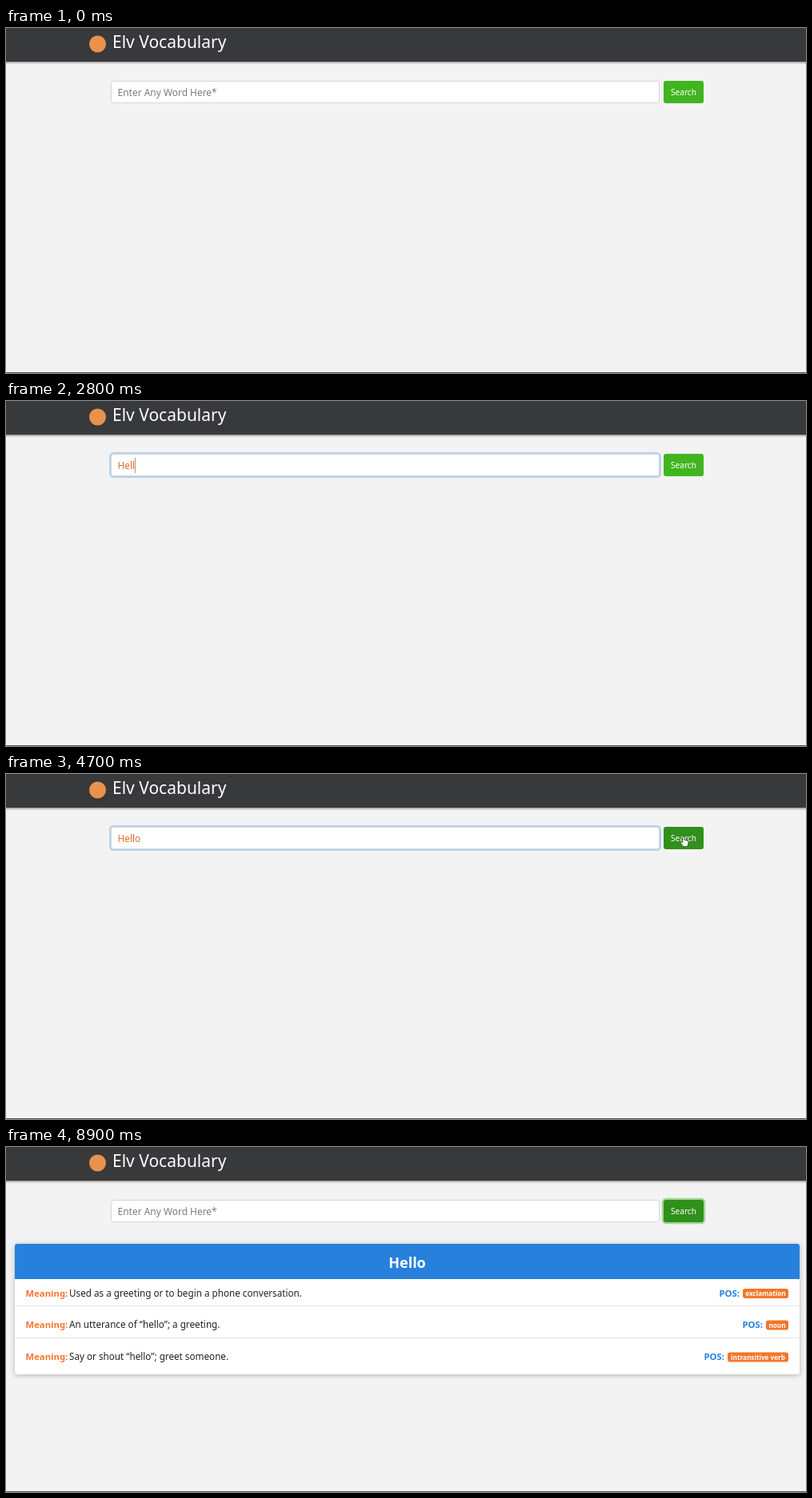
An HTML page for the animation above (9.4 s loop, 1000 by 431 pixels).

```html
<!DOCTYPE html>
<html lang="en">
<head>
<meta charset="utf-8">
<title>Word lookup</title>
<style>
  html, body { margin: 0; width: 100%; height: 100%; overflow: hidden; background: #f3f3f3; }
  svg { display: block; width: 1000px; height: 431px; font: 11.7px "Noto Sans", sans-serif; }
  .header { filter: drop-shadow(0 1px 1.5px #0008); }
  .card { filter: drop-shadow(0 1px 3px #0004); }
  .label { font-size: 11.3px; font-weight: 600; }
  .badge { font-size: 8.2px; font-weight: 700; fill: #fff; }
  .orange { fill: #f4762a; }
  .blue { fill: #2780dc; }
</style>
</head>
<body>
<svg viewBox="0 0 1000 431">
  <rect width="1000" height="431" fill="#f3f3f3"/>
  <rect class="header" x="-5" y="-5" width="1010" height="47" fill="#38393b"/>
  <circle cx="114.5" cy="20" r="10.5" fill="#e8924e"/>
  <text x="133" y="25" font-size="21" fill="#fff">Elv Vocabulary</text>

  <rect id="inputRing" x="130.3" y="65.3" width="687.4" height="29.4" rx="4" fill="none" stroke="#b9d2ee" stroke-width="2.6"/>
  <rect x="131.5" y="66.5" width="685" height="27" rx="3" fill="#fff" stroke="#d3d6d9"/>
  <text id="placeholder" x="139.6" y="84.7" font-size="11.95" fill="#797c80">Enter Any Word Here*</text>
  <text id="typed" x="139.6" y="84.7" font-size="11.8" fill="#dc6e2c"></text>
  <rect id="caret" y="71" width="1" height="19" fill="#d08a5c"/>

  <rect id="buttonRing" x="821" y="65" width="52" height="30" rx="4" fill="none" stroke="#a3d596" stroke-width="2.4"/>
  <rect id="button" x="822" y="66" width="50" height="28" rx="3"/>
  <text x="847" y="84" font-size="10.05" fill="#fff" text-anchor="middle">Search</text>
  <path id="hand" d="M-2 -6.5q1-1 2 0v4l4 1q1.3.4 1 2l-.7 3q-.3 1-1 2h-4.600q-2.500-3-3.700-5.500q.8-1.200 3 .6z" fill="#fff" stroke="#333" stroke-width=".6"/>

  <g id="results">
    <g class="card">
      <rect x="11" y="121" width="981" height="163" rx="3" fill="#fff"/>
      <path class="blue" d="M11 165V124q0-3 3-3H989q3 0 3 3V165z"/>
    </g>
    <path d="M11 198.500H992M11 238.500H992" stroke="#e4e4e4"/>
    <text x="501.500" y="150.500" font-size="18" font-weight="600" fill="#fff" text-anchor="middle">Hello</text>
  </g>
  <rect y="430" width="1000" height="1" fill="#555"/>
</svg>
<script>
const LOOP = 9400, STEP = 100;
const el = id => document.getElementById(id);
const [inputRing, placeholder, typed, caret, buttonRing, button, hand, results] =
  ["inputRing", "placeholder", "typed", "caret", "buttonRing", "button", "hand", "results"].map(el);

// Baseline, meaning, part of speech, left edge of its badge
const entries = [
  [186.5, "Used as a greeting or to begin a phone conversation.", "exclamation", 921],
  [226, "An utterance of “hello”; a greeting.", "noun", 950],
  [266, "Say or shout “hello”; greet someone.", "intransitive verb", 902],
];
results.insertAdjacentHTML("beforeend", entries.map(([y, meaning, pos, x]) => `
  <text class="label orange" x="24.5" y="${y}">Meaning:</text>
  <text x="79" y="${y}" fill="#222">${meaning}</text>
  <text class="label blue" x="${x - 4}" y="${y}" text-anchor="end">POS:</text>
  <rect class="orange" x="${x}" y="${y - 9.5}" width="${978 - x}" height="12" rx="3"/>
  <text class="badge" x="${(x + 978) / 2}" y="${y - 0.5}" text-anchor="middle">${pos}</text>`).join(""));

const keyTimes = [2100, 2300, 2600, 2800, 2900];
const caretTimes = [[1100, 1600], [2100, 3500], [4200, 4700]];
const ramp = (t, from, to) => Math.min(1, Math.max(0, (t - from) / (to - from)));
const show = (node, visible) => node.setAttribute("visibility", visible ? "visible" : "hidden");
const mix = (a, b, k) => `rgb(${a.map((v, i) => Math.round(v + (b[i] - v) * k))})`;

function draw(now) {
  const t = Math.floor(now % LOOP / STEP) * STEP;
  const done = t >= 8900;
  const word = done ? "" : "Hello".slice(0, keyTimes.filter(k => t >= k).length);
  typed.textContent = word;
  show(placeholder, !word);
  show(caret, caretTimes.some(([on, off]) => t >= on && t < off));
  caret.setAttribute("x", 139.6 + (word ? typed.getComputedTextLength() : 0));

  const clicked = ramp(t, 4900, 5100);
  inputRing.setAttribute("opacity", ramp(t, 1100, 1300) * (1 - clicked));
  buttonRing.setAttribute("opacity", clicked);
  button.setAttribute("fill", mix([64, 181, 32], [49, 144, 27], ramp(t, 4300, 4600)));

  const reach = 1 - (1 - ramp(t, 4300, 4700)) ** 2;
  hand.setAttribute("transform", `translate(${836 + 12 * reach} ${89 - 4 * reach})`);
  show(hand, t >= 4400 && t < 7100);
  show(results, done);
}

const start = performance.now();
(function tick() {
  draw(performance.now() - start);
  requestAnimationFrame(tick);
})();
</script>
</body>
</html>
```
